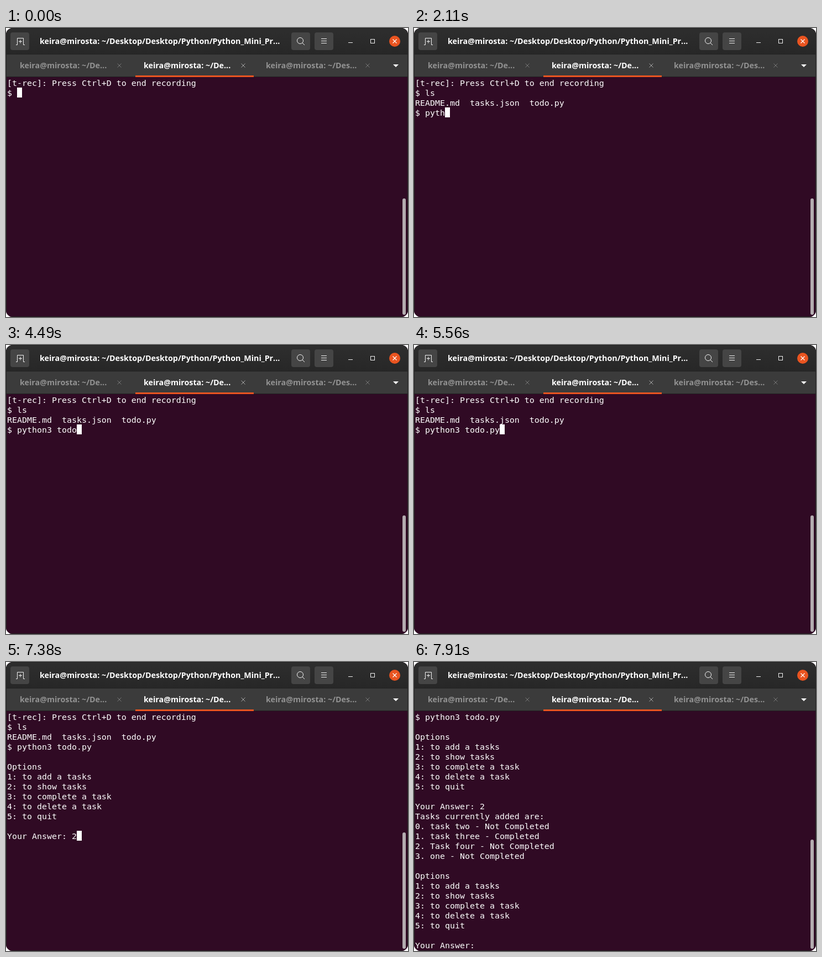
Recreate the animation shown at these times as an HTML page. Size 727 by 524 pixels, loop 8000 ms.

```html
<!DOCTYPE html>
<html lang="en">
<head>
<meta charset="utf-8">
<title>Terminal</title>
<style>
html, body { margin: 0; width: 100%; height: 100%; overflow: hidden; background: #fff; }
svg { position: absolute; left: 0; top: 0; }
svg text { font: bold 14.27px "Open Sans", "Noto Sans", sans-serif; fill: #fff; }
svg .dim { fill: #929292; }
pre {
  position: absolute; left: 2px; top: 90px; margin: 0; color: #fff;
  font: 14.95px/18px "DejaVu Sans Mono", monospace;
}
#output { position: relative; top: 1px; }
#cursor { display: inline-block; width: 9px; height: 18px; vertical-align: top; background: #fff; }
</style>
</head>
<body>
<svg width="727" height="524" viewBox="0 0 727 524">
  <defs>
    <linearGradient id="bar" x2="0" y2="1">
      <stop stop-color="#2e2e2e"/><stop offset="1" stop-color="#272727"/>
    </linearGradient>
    <clipPath id="window"><rect width="727" height="524" rx="12"/></clipPath>
    <rect id="button" width="34" height="32" rx="4" fill="#454545"/>
    <path id="cross" d="M-3.5-3.5l7 7m0-7l-7 7" fill="none"/>
  </defs>
  <g clip-path="url(#window)">
    <rect width="727" height="524" fill="#300a24"/>
    <rect width="727" height="48" fill="url(#bar)"/>
    <rect y="48" width="727" height="41" fill="#3b3b3b"/>
    <path d="M0 47.5h727M0 88.5h727" stroke="#222"/>
    <rect x="234" y="86" width="214" height="3" fill="#e95420"/>
    <rect x=".5" y=".5" width="726" height="523" fill="none" stroke="#1f1f1f"/>
  </g>

  <use href="#button" x="8" y="8"/>
  <use href="#button" x="516" y="8"/>
  <use href="#button" x="558" y="8"/>
  <g fill="none" stroke="#f2f2f2">
    <path d="M18 30.5h2.5v-12h11v12h2.5M23 24.5h6m-3-3v6"/>
    <circle cx="532" cy="23" r="5.5"/>
    <path d="M536 27l4 4M570 19.5h10m-10 4h10m-10 4h10M619 26.5h8"/>
    <rect x="659.5" y="20.5" width="7" height="7"/>
  </g>
  <circle cx="703" cy="24" r="10" fill="#e95420"/>
  <use href="#cross" x="703" y="24" stroke="#fff" stroke-width="1.2"/>
  <use href="#cross" x="205" y="68" stroke="#777"/>
  <use href="#cross" x="429" y="68" stroke="#aaa"/>
  <use href="#cross" x="654" y="68" stroke="#777"/>
  <path d="M700 66h10l-5 5z" fill="#fff"/>

  <text x="61" y="29">keira@mirosta: ~/Desktop/Desktop/Python/Python_Mini_Pr...</text>
  <text x="25" y="73" class="dim">keira@mirosta: ~/De...</text>
  <text x="249" y="73">keira@mirosta: ~/De...</text>
  <text x="470" y="73" class="dim">keira@mirosta: ~/Des...</text>
  <rect id="thumb" x="717" width="6" rx="3" fill="#b3abaf"/>
</svg>
<pre><span id="output"></span><span id="cursor"></span></pre>

<script>
const LOOP = 8000, ROWS = 24;
const START = '[t-rec]: Press Ctrl+D to end recording\n$ ';
const MENU = `

Options
1: to add a tasks
2: to show tasks
3: to complete a task
4: to delete a task
5: to quit

Your Answer: `;
const TASKS = `
Tasks currently added are:
0. task two - Not Completed
1. task three - Completed
2. Task four - Not Completed
3. one - Not Completed`;

// [time, appended text]; an empty text blinks the cursor
const steps = [
  [250, ''], [510, 'l'], [760, 's'],
  [1040, '\nREADME.md  tasks.json  todo.py\n$ '],
  [1320, ''], [1570, 'p'], [1830, 'y'], [2110, 'th'], [2360, 'o'], [2630, 'n'], [2910, '3'],
  [3160, ''], [3410, ''], [3690, ' '], [3940, 't'], [4220, 'od'], [4490, 'o'],
  [4770, ''], [5020, '.'], [5280, 'p'], [5560, 'y'], [5840, ''],
  [6090, MENU], [6340, ''], [6600, ''], [6850, ''], [7100, ''],
  [7380, '2'], [7630, TASKS + MENU], [7910, '']
];

const byId = id => document.getElementById(id);
const output = byId('output'), cursor = byId('cursor'), thumb = byId('thumb');

function draw(time) {
  let text = START, on = true;
  for (const [at, added] of steps) {
    if (at > time) break;
    text += added;
    on = added ? true : !on;
  }
  const lines = text.split('\n');
  const top = lines.length > ROWS ? 322 : 309;
  output.textContent = lines.slice(-ROWS).join('\n');
  cursor.style.visibility = on ? 'visible' : 'hidden';
  thumb.setAttribute('y', top);
  thumb.setAttribute('height', 520 - top);
}

const began = performance.now();
function tick() {
  draw((performance.now() - began) % LOOP);
  requestAnimationFrame(tick);
}
tick();
</script>
</body>
</html>
```
